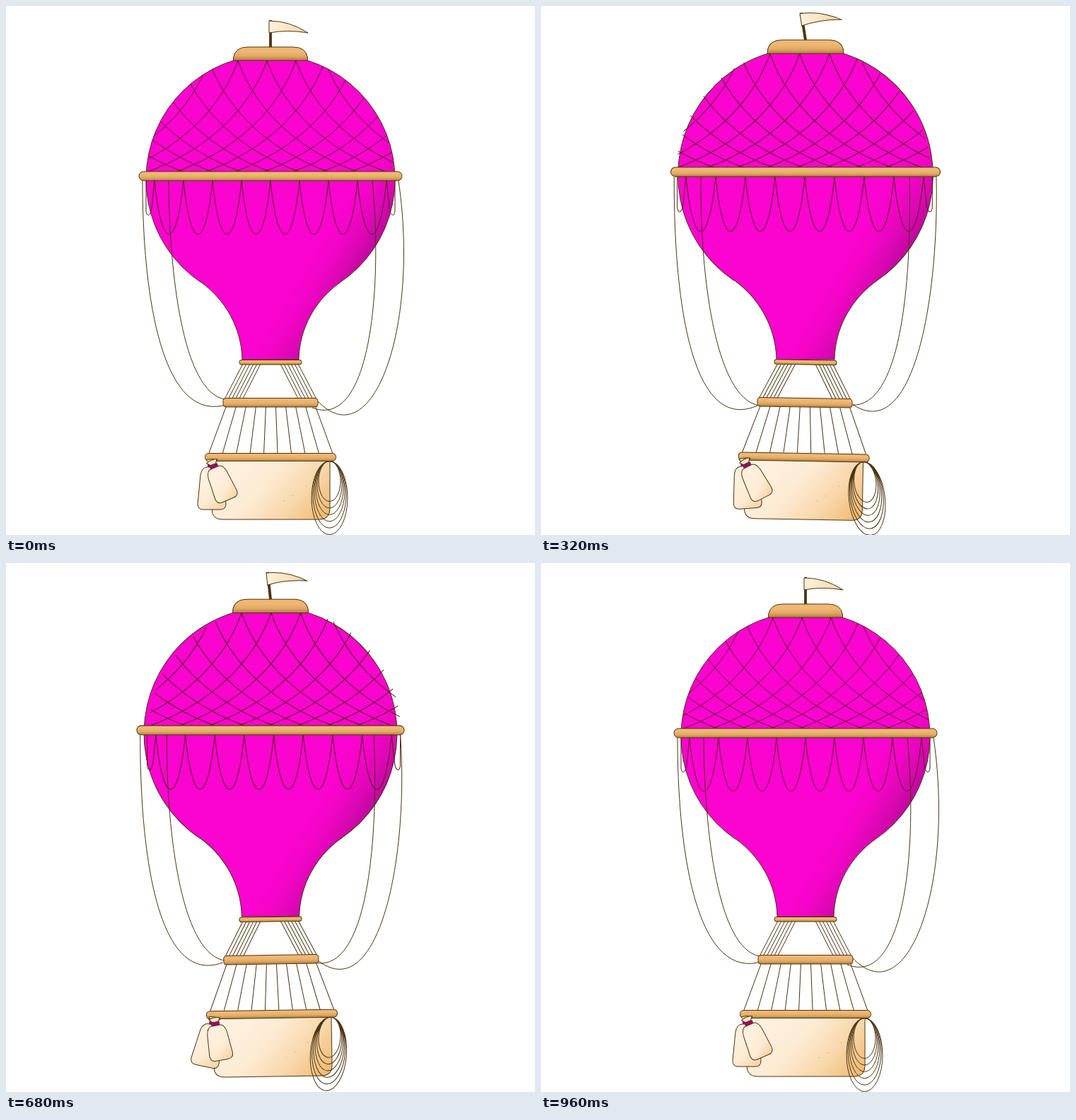
Animation of 748 by 748 pixels, one loop 1 s. Source, as an HTML page with a canvas:

```html
<!DOCTYPE html>
<html lang="en">
<head>
<meta charset="utf-8">
<title>Balloon</title>
<style>
html, body { margin: 0; width: 100%; height: 100%; overflow: hidden; background: #fff; }
canvas { display: block; width: 100vw; height: 100vh; }
</style>
</head>
<body>
<canvas id="stage" width="748" height="748"></canvas>
<script>
const ctx = document.getElementById('stage').getContext('2d');
const LINE = '#4b3510', NET = '#5c1a22', RAD = Math.PI / 180;
const CX = 374, CY = 503;

// Pose keys, counted in steps of 40 ms; the cycle closes at step 24
const KEYS = [0, 4, 8, 12, 15, 19, 24];
const TILT = [0, 0.75, 1, -0.2, -0.85, -0.65, 0];
const NET_X = [0, -2, -3, 2, 5.5, 5, 0];
const SKIRT_X = [0, -2, -1, 0, 3, 5, 0];
const BAGS = [0, -2.5, -4, 7, 13, 10, 0];
const COIL = [0, -5.5, -6.5, -0.5, 4, 3, 0];

// Periodic cubic interpolation through the keys
function sample(vals, k) {
  const n = KEYS.length - 1;
  const key = i => KEYS[(i + n) % n] + 24 * Math.floor(i / n);
  const val = i => vals[(i + n) % n];
  const slope = i => (val(i + 1) - val(i - 1)) / (key(i + 1) - key(i - 1));
  let i = 0;
  while (i < n - 1 && k >= KEYS[i + 1]) i++;
  const h = key(i + 1) - key(i), t = (k - key(i)) / h;
  const t2 = t * t, t3 = t2 * t;
  return (2 * t3 - 3 * t2 + 1) * val(i) + (t3 - 2 * t2 + t) * h * slope(i) +
    (3 * t2 - 2 * t3) * val(i + 1) + (t3 - t2) * h * slope(i + 1);
}

function gradient(x0, y0, x1, y1, ...colors) {
  const g = ctx.createLinearGradient(x0, y0, x1, y1);
  colors.forEach((c, i) => g.addColorStop(i / (colors.length - 1), c));
  return g;
}

function group(draw) {
  ctx.save();
  draw();
  ctx.restore();
}

function spin(x, y, deg) {
  ctx.translate(x, y);
  ctx.rotate(deg * RAD);
}

// The balloon swells from its neck
function swell(u) {
  ctx.translate(CX, CY);
  ctx.scale(1 + 0.031 * u, 1 + 0.0287 * u);
  ctx.translate(-CX, -CY);
}

function shape(path, fill, stroke = LINE, width = 1) {
  if (fill) {
    ctx.fillStyle = fill;
    ctx.fill(path);
  }
  ctx.strokeStyle = stroke;
  ctx.lineWidth = width;
  ctx.stroke(path);
}

const wood = (y, h) => gradient(0, y, 0, y + h, '#efb875', '#efb774', '#e2a964', '#b07f40');

function bar(x, y, w, h, r) {
  const p = new Path2D();
  p.roundRect(x, y, w, h, r);
  shape(p, wood(y, h));
}

const ENVELOPE = (() => {
  const p = new Path2D();
  const a = Math.atan2(145, 99);
  p.moveTo(334, 500);
  p.bezierCurveTo(333, 455, 310, 415, 275, 390);
  p.arc(CX, 245, 176, Math.PI - a, a);
  p.bezierCurveTo(438, 415, 415, 455, 414, 500);
  p.closePath();
  return p;
})();

const NETTING = (() => {
  const p = new Path2D(), mid = 369;
  for (let x = -287; x <= 82; x += 41) {
    for (const d of [1, -1]) {
      const at = v => mid + d * (x + v);
      p.moveTo(at(0), 77);
      p.bezierCurveTo(at(20), 135, at(75), 205, at(185), 240);
    }
  }
  return p;
})();

const SKIRT = (() => {
  const p = new Path2D();
  p.moveTo(198, 247);
  p.lineTo(198, 290);
  p.bezierCurveTo(199, 299, 205, 297, 206, 285);
  p.lineTo(210, 247);
  for (let x = 210; x < 538; x += 41)
    p.bezierCurveTo(x + 10, 348, x + 31, 348, x + 41, 247);
  p.lineTo(542, 285);
  p.bezierCurveTo(543, 297, 549, 299, 550, 290);
  p.lineTo(550, 247);
  return p;
})();

const HAT = new Path2D('M321.5 77V73Q324 58 342 58H406Q424 58 426.5 73V77Z');
const FLAG = new Path2D('M-2-37Q27-37 53-20Q24-25-2-20Z');
const BASKET = new Path2D('M291 643H458V711Q458 726 443 726H306Q291 726 291 711Z');

function drawBalloon(u, k) {
  swell(u);
  group(() => {
    spin(CX, 58, -11.5 * u);
    shape(new Path2D('M0 0V-38'), null, LINE, 3.8);
    shape(FLAG, gradient(0, -37, 45, -18, '#fff1de', '#f7d9ae'));
  });
  shape(ENVELOPE, gradient(470, 284, 536, 324, '#fb04cf', '#f304c7', '#dc07b4', '#b8099a'));
  group(() => {
    ctx.translate(sample(NET_X, k), 0);
    ctx.clip(ENVELOPE);
    shape(NETTING, null, NET);
  });
  group(() => {
    ctx.translate(sample(SKIRT_X, k), 0);
    shape(SKIRT, null, NET);
  });
  shape(HAT, wood(58, 19));
}

// Each rope: control points at rest, then with the balloon fully swollen
const ROPES = [
  [[193, 247, 193, 390, 215, 585, 307, 565], [187, 240, 186, 410, 209, 613, 306, 565]],
  [[230, 247, 231, 380, 250, 545, 309, 556], [225, 240, 223, 400, 250, 570, 315, 568]],
  [[555, 247, 585, 450, 520, 640, 441, 559], [560, 240, 557, 400, 530, 615, 441, 565]],
  [[518, 247, 533, 400, 515, 600, 433, 568], [522, 240, 522, 400, 505, 560, 441, 563]]
];

function drawRopes(u) {
  const p = new Path2D();
  for (const [a, b] of ROPES) {
    const c = a.map((v, i) => v + (b[i] - v) * u);
    p.moveTo(c[0], c[1]);
    p.bezierCurveTo(...c.slice(2));
  }
  shape(p);
}

function bag(x, y, deg, top, bottom, len) {
  group(() => {
    spin(x, y, deg);
    const p = new Path2D(), r = 8;
    p.moveTo(-6, 2);
    p.quadraticCurveTo(-top, 2, -top - 2, 13);
    p.lineTo(-bottom, len - r);
    p.quadraticCurveTo(-bottom, len, -bottom + r, len);
    p.lineTo(bottom - r, len);
    p.quadraticCurveTo(bottom, len, bottom, len - r);
    p.lineTo(top + 2, 13);
    p.quadraticCurveTo(top, 2, 6, 2);
    p.closePath();
    shape(p, gradient(-bottom / 2, len / 3, bottom, len, '#fff0dd', '#fdebd3', '#f5cf9c'));
    shape(new Path2D('M-4-3L-8-8Q0-11 8-8L4-3Z'), '#fbe4c5');
    ctx.fillStyle = '#8c1260';
    ctx.fillRect(-6, -3, 12, 5);
  });
}

function drawCar(k) {
  const tilt = sample(TILT, k), swing = sample(BAGS, k) - tilt;
  spin(CX, CY, tilt);
  ctx.translate(-CX, -CY);

  const cords = new Path2D();
  const cord = (x0, y0, x1, y1) => {
    cords.moveTo(x0, y0);
    cords.lineTo(x1, y1);
  };
  for (let i = 0; i < 6; i++) {
    for (const d of [1, -1])
      cord(CX + d * (14.5 + 5 * i), 507, CX + d * (39 + 5.1 * i), 555);
  }
  for (let i = 0; i < 10; i++)
    cord(311 + 14.1 * i, 567, 287 + 19.4 * i, 632);
  shape(cords);

  bar(330, 500.5, 88, 6.5, 3);
  bar(307, 554.5, 134, 12.5, 4);
  shape(BASKET, gradient(325, 645, 440, 745, '#fff0de', '#fdebd4', '#f8d6a8', '#efb66d'));
  ctx.fillStyle = '#c58b48';
  for (const [x, y] of [[393, 699], [405, 692], [424, 678]]) ctx.fillRect(x, y, 1, 1);
  bar(281.5, 632.5, 185, 11, 5);

  // Hanging parts keep their own angle, free of the car's tilt
  bag(291, 650, swing, 14, 20, 62);
  bag(294, 651, -23 + swing, 12, 16.5, 51.5);

  group(() => {
    spin(457.5, 643.5, sample(COIL, k) - tilt);
    const p = new Path2D();
    for (let i = 0; i < 6; i++) {
      const rx = 15.5 + 2 * i, ry = 28.5 + 4.7 * i;
      p.moveTo(rx, ry);
      p.ellipse(0, ry, rx, ry, 0, 0, 2 * Math.PI);
    }
    shape(p);
  });
}

function drawHoop(u) {
  swell(u);
  bar(188, 234, 372, 13, 6.5);
}

function frame(now) {
  const k = Math.floor((now % 1000) / 40);
  const u = (1 - Math.cos(2 * Math.PI * Math.min(k, 23) / 23)) / 2;
  ctx.fillStyle = '#fff';
  ctx.fillRect(0, 0, 748, 748);
  group(() => drawBalloon(u, k));
  drawRopes(u);
  group(() => drawHoop(u));
  group(() => drawCar(k));
}

let start;
function tick(now) {
  start ??= now;
  frame(now - start);
  requestAnimationFrame(tick);
}
frame(0);
requestAnimationFrame(tick);
</script>
</body>
</html>
```
